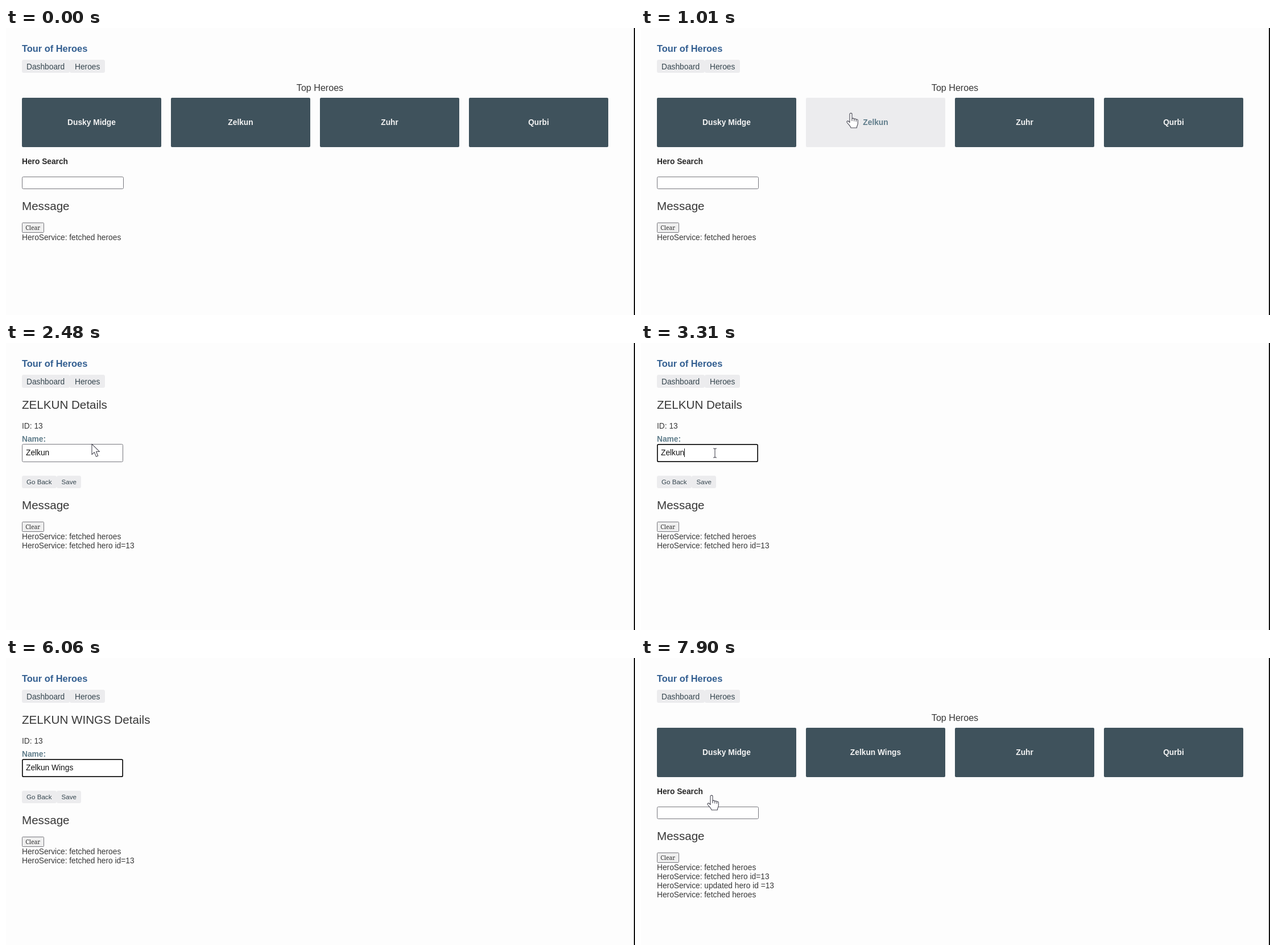
Write an HTML page with a canvas that moves like this. It is 1106 by 506 pixels and loops after 8000 ms.

```html
<!DOCTYPE html>
<html lang="en">
<head>
<meta charset="utf-8">
<title>Tour of Heroes</title>
<style>
  html, body { margin: 0; width: 100%; height: 100%; overflow: hidden; background: #fdfdfd; }
  canvas { display: block; }
</style>
</head>
<body>
<canvas id="stage" width="1106" height="506"></canvas>
<script>
const ctx = document.getElementById('stage').getContext('2d');
const LOOP = 8000;
const SANS = '"Liberation Sans", Arial, sans-serif';
const SERIF = '"Noto Serif", serif';
const INK = '#383838', SLATE = '#607d8b', SOFT = '#ececee', BORDER = '#77777d';

const HERO = 'Zelkun';
const SUFFIX = ' Wings';
const KEY_TIMES = [3720, 3890, 3950, 4110, 4220, 4420];
const FETCHED = 'HeroService: fetched heroes';
const LOG = [FETCHED, 'HeroService: fetched hero id=13', 'HeroService: updated hero id =13', FETCHED];

const OPENED = 1380, LOADED = 1940, FOCUSED = 2990, SAVED = 7060, RETURNED = 7440, REFRESHED = 7900;

// Pointer path: time, x, y
const PATH = [
  [60, 1090, 480], [740, 302, 209], [830, 318, 196], [1010, 369, 150], [2110, 369, 150],
  [2480, 151, 178], [2910, 130, 194], [6810, 130, 194], [7040, 124, 242]
];
// Click rings: start, end
const CLICKS = [[1290, 1455], [2960, 3250], [7060, 7420]];

const CARD = { y: 123, w: 245, h: 87, x: i => 28 + 262 * i };
const FIELD = [28, 178, 178, 32];
const SAVE = [89, 234, 43, 22];

const HAND = new Path2D(
  'M-2 2C-2-.5 2-.5 2 2V10C3 8.5 5.5 9 5.8 10.8C7 9.5 9 10 9.3 11.6' +
  'C10.5 10.5 12.3 11 12.3 13V18C12.3 21 10.5 22 10.3 26H0' +
  'C-.5 22.5-4.5 20-6.8 16.5C-8 14.5-5.5 13-4 14.5L-2 16.5Z');
const KNUCKLES = new Path2D('M2 10V14M5.8 10.8V14.5M9.3 11.6V15');
const ARROW = new Path2D('M0 0V18.5L4.4 14.6L7.6 22.3L10.8 21L7.6 13.5H13.6Z');
const IBEAM = new Path2D('M-3-8H-1L0-7L1-8H3M0-7V7M-3 8H-1L0 7L1 8H3');

function text(str, x, y, size = 13.75, color = INK, { bold = false, align = 'left', family = SANS } = {}) {
  ctx.font = `${bold ? 'bold ' : ''}${size}px ${family}`;
  ctx.textAlign = align;
  ctx.fillStyle = color;
  ctx.fillText(str, x, y);
}

function box([x, y, w, h], fill, stroke, width = 1, radius = 2) {
  const inset = stroke ? width / 2 : 0;
  ctx.beginPath();
  ctx.roundRect(x + inset, y + inset, w - 2 * inset, h - 2 * inset, radius);
  ctx.fillStyle = fill;
  ctx.fill();
  if (!stroke) return;
  ctx.strokeStyle = stroke;
  ctx.lineWidth = width;
  ctx.stroke();
}

const inside = (p, [x, y, w, h]) => p.x >= x && p.x <= x + w && p.y >= y && p.y <= y + h;
const cardRect = i => [CARD.x(i), CARD.y, CARD.w, CARD.h];

function pointerAt(t) {
  const next = PATH.findIndex(p => p[0] > t);
  if (next < 1) {
    const [, x, y] = next ? PATH[PATH.length - 1] : PATH[0];
    return { x, y };
  }
  const [t0, x0, y0] = PATH[next - 1], [t1, x1, y1] = PATH[next];
  const k = (t - t0) / (t1 - t0);
  return { x: x0 + (x1 - x0) * k, y: y0 + (y1 - y0) * k };
}

function drawHeader() {
  text('Tour of Heroes', 28, 42, 16.4, '#335f91', { bold: true });
  box([28, 56, 84, 23], SOFT, null, 0, 3);
  box([112, 56, 62, 23], SOFT, null, 0, 3);
  text('Dashboard', 36, 72.5, 13.75, '#35454e');
  text('Heroes', 121, 72.5, 13.75, '#35454e');
}

function drawMessages(top, count) {
  text('Message', 28, top - 22, 20.6);
  box([28, top, 39, 18], '#efefef', BORDER, 1, 1);
  text('Clear', 47.3, top + 13, 10.4, '#333', { align: 'center', family: SERIF });
  LOG.slice(0, count).forEach((line, i) => text(line, 28, top + 31 + 16.1 * i));
}

function drawDashboard(t, pointer) {
  const loaded = t < OPENED || t >= REFRESHED;
  const lift = loaded ? 0 : 98;
  text('Top Heroes', 552, 110.5, 16.1, INK, { align: 'center' });
  if (loaded) {
    const second = t < OPENED ? HERO : HERO + SUFFIX;
    ['Dusky Midge', second, 'Zuhr', 'Qurbi'].forEach((name, i) => {
      const hover = t >= 60 && inside(pointer, cardRect(i));
      box(cardRect(i), hover ? SOFT : '#3f525c');
      text(name, CARD.x(i) + CARD.w / 2, 171, 13.75, hover ? SLATE : '#f3f3f3', { bold: true, align: 'center' });
    });
  }
  text('Hero Search', 28, 240 - lift, 13.75, '#282828', { bold: true });
  box([28, 262 - lift, 179, 22], '#fff', BORDER);
  drawMessages(343 - lift, t < OPENED ? 1 : loaded ? 4 : 3);
}

function drawDetails(t, pointer) {
  const typed = KEY_TIMES.filter(k => k <= t).length;
  const name = HERO + SUFFIX.slice(0, typed);
  const focused = t >= FOCUSED && t < SAVED;
  text(`${name.toUpperCase()} Details`, 28, 116, 20.6);
  text('ID: 13', 28, 151);
  text('Name:', 28, 174, 13.75, SLATE, { bold: true });
  box(FIELD, '#fff', focused ? '#101010' : BORDER, focused ? 1.7 : 1);
  text(name, 35, 198, 13.75, '#111');
  const blinkOn = t < 4420 || Math.floor((t - 4290) / 590) % 2 === 0;
  if (focused && blinkOn) {
    const caretX = Math.round(35 + ctx.measureText(name).width);
    ctx.fillRect(caretX, 186, 1, 15);
  }
  const hover = t > 6810 && inside(pointer, SAVE);
  box([28, 234, 61, 22], SOFT, null, 0, 3);
  box(SAVE, hover ? '#cad4d8' : SOFT, t >= SAVED ? '#101010' : null, 1.7, 3);
  text('Go Back', 36, 249, 11.6, '#35454e');
  text('Save', 97.5, 249, 11.6, '#35454e');
  drawMessages(315, 2);
}

function drawPointer(t, p) {
  if (t < 60 || (t >= KEY_TIMES[0] && t < 6810)) return;
  const early = t < 2110;
  const hand = early ? [0, 1, 2, 3].some(i => inside(p, cardRect(i))) : inside(p, SAVE);
  const beam = !early && inside(p, FIELD) && p.y > 179;
  ctx.save();
  ctx.translate(p.x, p.y);
  ctx.lineWidth = 1.1;
  ctx.lineJoin = 'round';
  ctx.strokeStyle = '#4a4a55';
  ctx.fillStyle = '#fff';
  const shape = hand ? HAND : beam ? IBEAM : ARROW;
  if (!beam) ctx.fill(shape);
  ctx.stroke(shape);
  if (hand) ctx.stroke(KNUCKLES);
  for (const [start, end] of CLICKS) {
    if (t < start || t >= end) continue;
    const radius = 9 * Math.min(1, (t - start) / 80, (end - t) / 100);
    ctx.beginPath();
    ctx.arc(0, hand ? -1 : 0, radius, 0, 2 * Math.PI);
    ctx.strokeStyle = '#e03540';
    ctx.lineWidth = 1.4;
    ctx.stroke();
  }
  ctx.restore();
}

function draw(t) {
  const pointer = pointerAt(t);
  ctx.fillStyle = '#fdfdfd';
  ctx.fillRect(0, 0, 1106, 506);
  ctx.fillStyle = '#111';
  ctx.fillRect(1104, 0, 2, 506);
  drawHeader();
  if (t < OPENED || t >= RETURNED) drawDashboard(t, pointer);
  else if (t < LOADED) drawMessages(138.5, 1);
  else drawDetails(t, pointer);
  drawPointer(t, pointer);
}

const begin = performance.now();
function tick() {
  draw((performance.now() - begin) % LOOP);
  requestAnimationFrame(tick);
}
tick();
</script>
</body>
</html>
```
